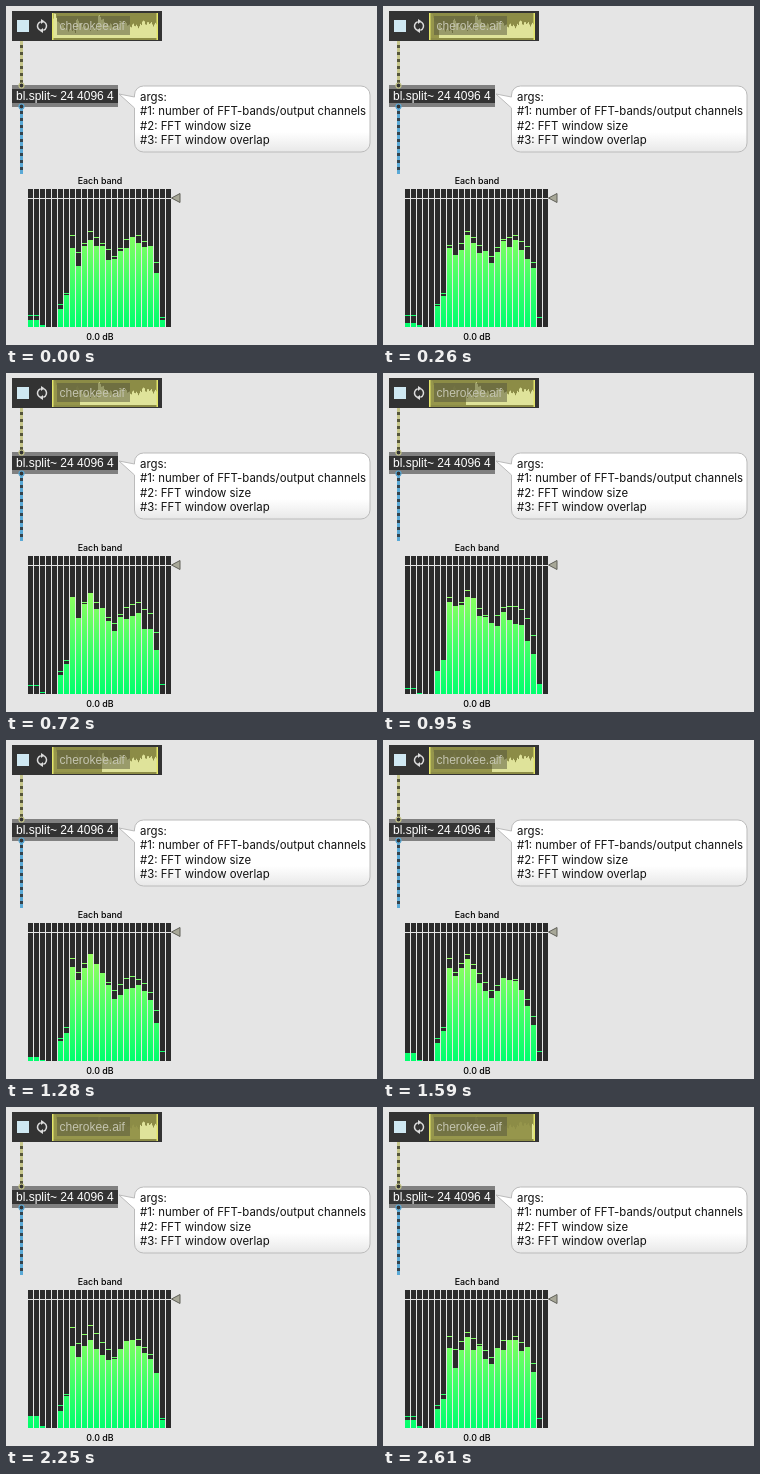
These frames come from a looping animation (371x339 px, 2660 ms). An HTML page with a canvas:

```html
<!DOCTYPE html>
<html lang="en">
<meta charset="utf-8">
<style>
  html, body { margin: 0; width: 100%; height: 100%; overflow: hidden; background: #e5e5e5; }
  canvas { display: block; }
</style>
<canvas width="371" height="339"></canvas>
<script>
const LOOP = 2660, STEP = 46.67, HOLD = 850, FLOOR = 321, PITCH = 6;
const GRAY = '#e5e5e5', DARK = '#333';
const OBJECT_FONT = '12px "Liberation Sans", sans-serif';
const LABEL_FONT = '500 8.9px Inter, sans-serif';
const ctx = document.querySelector('canvas').getContext('2d');

// Average spectrum as [band, y] points; the bands between them are interpolated.
const spectrum = [[0, 315], [1, 315], [2, 320], [4, 321], [5, 301], [6, 290], [7, 234], [8, 246],
  [10, 226], [12, 241], [14, 255], [16, 241], [18, 241], [20, 255], [21, 273], [22, 319], [23, 330]];

function averageTop(band) {
  const n = spectrum.findIndex(([b]) => b >= band);
  const [b1, y1] = spectrum[n];
  if (b1 === band) return y1;
  const [b0, y0] = spectrum[n - 1];
  return y0 + (y1 - y0) * (band - b0) / (b1 - b0);
}

const wave = (t, cycles, phase) => Math.cos(2 * Math.PI * (cycles * t / LOOP + phase));

// Low and high bands trade energy once per loop, with a quick flutter on top.
function bandTop(band, t) {
  if (band === 3 || band === 4) return FLOOR;
  let move;
  if (band < 3) move = (band < 2 ? 6 : 1) * wave(t, 1, -0.28);
  else {
    const sway = band < 7 || band > 21 ? 0 : 12 - 24 * (band - 7) / 14;
    const flutter = band < 7 ? 3 : band > 21 ? 8 : 5;
    move = sway * wave(t, 1, 0.06) + flutter * wave(t, 4 + band * 5 % 4, band * 0.38);
  }
  return Math.min(FLOOR, Math.round(averageTop(band) + move));
}

function text(str, x, y, font, color = '#000', align = 'left') {
  ctx.font = font;
  ctx.fillStyle = color;
  ctx.textAlign = align;
  ctx.fillText(str, x, y);
}

function rect(x, y, w, h, color) {
  ctx.fillStyle = color;
  ctx.fillRect(x, y, w, h);
}

function ring(x, y, color) {
  ctx.beginPath();
  ctx.arc(x, y, 2.5, 0, 7);
  ctx.fillStyle = DARK;
  ctx.fill();
  ctx.strokeStyle = color;
  ctx.lineWidth = 1.2;
  ctx.stroke();
}

// Drum hits that decay onto a slowly rising bed.
function waveHeight(x) {
  const sinceHit = (x - 48) % 22, hit = Math.floor((x - 48) / 22);
  const peak = hit > 2 ? 17 : hit % 2 ? 19 : 24;
  const bed = 4 + (x - 47) * 0.09;
  const ripple = 1.5 * Math.sin(x * 1.7) + Math.sin(x * 0.8);
  return Math.max(2, bed + (peak - bed) * Math.exp(-sinceHit / 8) + ripple);
}

function drawPlayer(t) {
  rect(6, 5, 150, 30, DARK);
  rect(11, 14, 12, 12, '#cfe8f2');
  for (const turn of [0.5, 1.5]) {
    ctx.save();
    ctx.translate(36, 20);
    ctx.rotate(turn * Math.PI);
    ctx.strokeStyle = ctx.fillStyle = '#ddd';
    ctx.lineWidth = 1.5;
    ctx.beginPath();
    ctx.arc(0, 0, 4.5, -2.9, -0.3);
    ctx.stroke();
    ctx.beginPath();
    ctx.moveTo(2, -1); ctx.lineTo(7, -1); ctx.lineTo(4.7, 2.5);
    ctx.fill();
    ctx.restore();
  }
  rect(46, 7, 106, 27, '#8c8c46');
  const playhead = 47 + 104 * t / LOOP;
  for (let x = 47; x < 151; x++) {
    const h = waveHeight(x);
    rect(x, 32 - h, 1, h, x < playhead ? '#96964c' : '#dfe39a');
  }
  rect(46, 7, 1.5, 27, '#e4e66a');
  rect(150.5, 7, 1.5, 27, '#e4e66a');
  rect(51, 10, 73, 19, 'rgba(85, 85, 60, 0.5)');
  text('cherokee.aif', 53.5, 24, OBJECT_FONT, '#c4c4b0');
}

function drawCord(y1, y2, color, dash) {
  ctx.lineWidth = 3;
  for (const [style, pattern] of [[color, []], [dash, [3, 4]]]) {
    ctx.strokeStyle = style;
    ctx.setLineDash(pattern);
    ctx.lineDashOffset = 3;
    ctx.beginPath();
    ctx.moveTo(15.5, y1);
    ctx.lineTo(15.5, y2);
    ctx.stroke();
  }
  ctx.setLineDash([]);
}

function drawObject() {
  drawCord(35, 80, '#c5c58a', '#55553a');
  drawCord(101, 168, '#5aa9d6', '#35434c');
  rect(6, 79, 106, 22, '#808080');
  rect(6, 83, 106, 14, DARK);
  ring(15.5, 79.5, '#c5c58a');
  ring(15.5, 100.5, '#5aa9d6');
  text('bl.split~ 24 4096 4', 10, 94, OBJECT_FONT, '#fff');
}

function drawBubble() {
  ctx.beginPath();
  ctx.moveTo(113, 88);
  ctx.lineTo(128.5, 102);
  ctx.arcTo(128.5, 146, 138, 146, 9);
  ctx.arcTo(364, 146, 364, 136, 9);
  ctx.arcTo(364, 80, 354, 80, 9);
  ctx.arcTo(128.5, 80, 128.5, 91, 9);
  ctx.lineTo(128.5, 91);
  ctx.closePath();
  const shade = ctx.createLinearGradient(0, 126, 0, 146);
  shade.addColorStop(0, '#fff');
  shade.addColorStop(1, '#e8e8e8');
  ctx.fillStyle = shade;
  ctx.fill();
  ctx.strokeStyle = '#bbb';
  ctx.lineWidth = 1;
  ctx.stroke();
  ['args:', '#1: number of FFT-bands/output channels', '#2: FFT window size', '#3: FFT window overlap']
    .forEach((line, i) => text(line, 134, 95 + i * 14.4, '11.4px Inter, sans-serif', '#111'));
}

function drawBands(t) {
  text('Each band', 94, 178, LABEL_FONT, '#000', 'center');
  text('0.0 dB', 94, 334, LABEL_FONT, '#000', 'center');
  rect(22, 183, 143, 138, '#2b2b2b');
  const green = ctx.createLinearGradient(0, 183, 0, FLOOR);
  green.addColorStop(0, '#c4ff5a');
  green.addColorStop(1, '#00ff6e');
  for (let band = 0; band < 24; band++) {
    const x = 22 + band * PITCH, top = bandTop(band, t);
    let peak = top;
    for (let ago = STEP; ago < HOLD; ago += STEP) peak = Math.min(peak, bandTop(band, t - ago));
    rect(x, top, PITCH - 1, FLOOR - top, green);
    if (peak < FLOOR) rect(x, peak, PITCH - 1, 1, green);
    if (band) rect(x - 1, 183, 1, 138, GRAY);
  }
  rect(22, 192, 143, 1, GRAY);
  ctx.beginPath();
  ctx.moveTo(165.5, 192); ctx.lineTo(174, 187.5); ctx.lineTo(174, 196.5);
  ctx.closePath();
  ctx.fillStyle = '#a8a898';
  ctx.fill();
  ctx.strokeStyle = '#606058';
  ctx.stroke();
}

function draw(now) {
  const time = now % LOOP;
  const t = time < 30 ? 0 : 30 + Math.floor((time - 30) / STEP) * STEP;
  rect(0, 0, 371, 339, GRAY);
  drawPlayer(t);
  drawObject();
  drawBubble();
  drawBands(t);
  requestAnimationFrame(draw);
}
requestAnimationFrame(draw);
</script>
</html>
```
